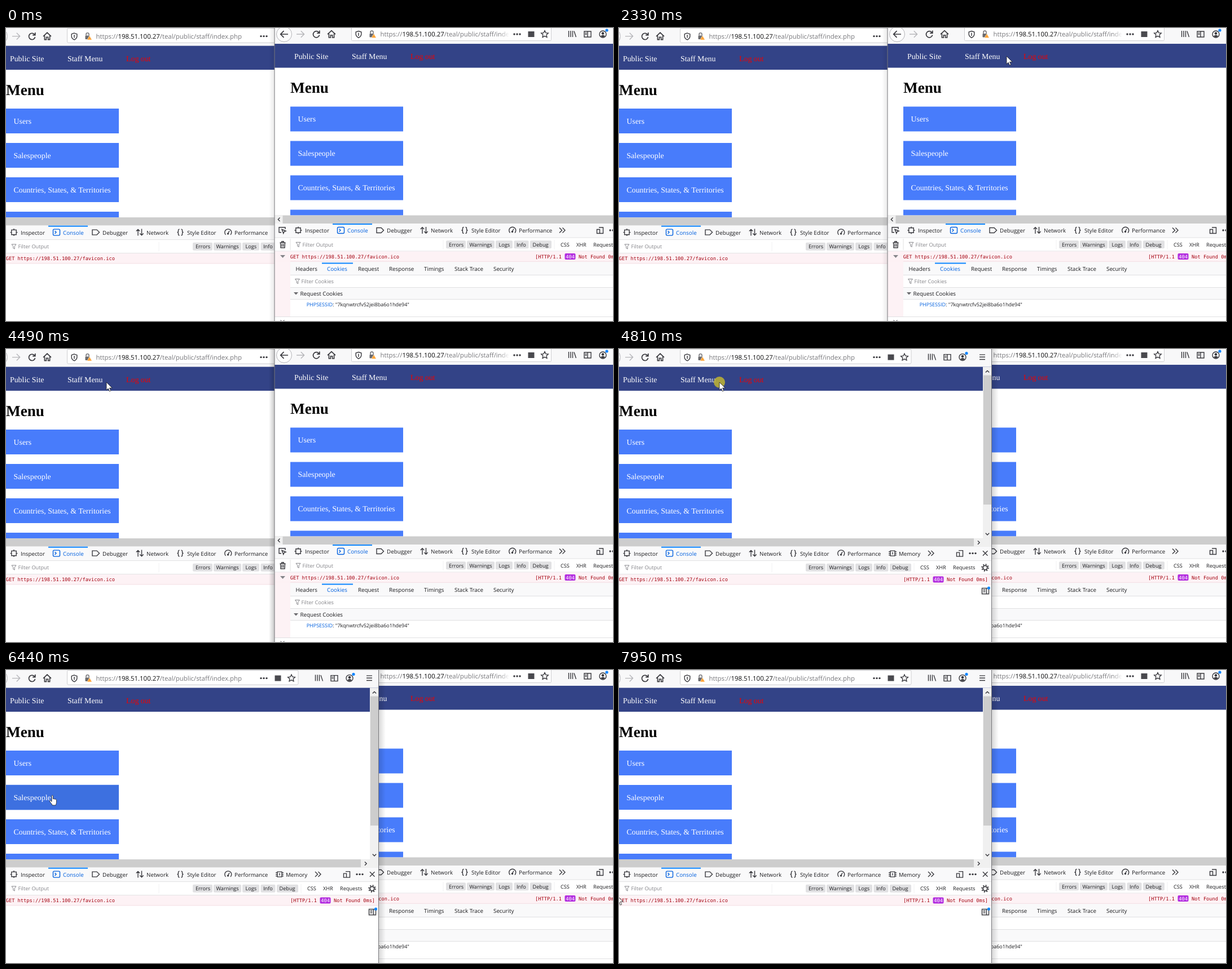
An HTML page for the animation above (8 s loop, 1076 by 520 pixels).

```html
<!DOCTYPE html>
<html lang="en">
<head>
<meta charset="utf-8">
<title>Two windows</title>
<style>
html, body { margin: 0; width: 100%; height: 100%; overflow: hidden; background: #fff }
svg { display: block; width: 1076px; height: 520px }
text { font: 9.8px "Open Sans", "Noto Sans", sans-serif; fill: #1c1c1f; text-rendering: geometricPrecision; white-space: pre }
.url { font-size: 11.42px; fill: #77777b }
.url tspan { fill: #0c0c0d }
.serif text { font: 13.85px "Liberation Serif", serif; fill: #fff }
.serif .h { font-size: 27.2px; font-weight: bold; fill: #000 }
.serif .out { fill: #f00000 }
.mono { font: 8.69px "DejaVu Sans Mono", monospace; fill: #a4000f }
.small { font-size: 9.2px }
.tiny { font-size: 9px }
.tip text { font-size: 9.96px }
.dim { fill: #85858a }
.blue { fill: #0060df }
.i { fill: none; stroke: #38383d; stroke-width: 1.4 }
.line { stroke: #e0e0e2; stroke-width: 1 }
.pale { stroke: #f1f1f2 }
.btn { fill: #487cfb }
.hover { fill: #3d70e0 }

.front, .shade, .click, .hover, .tip, .cursor { animation: 8s step-end infinite }
.front { animation-name: front }
.shade { animation-name: shade }
.click { animation-name: click }
.users { animation-name: users }
.sales { animation-name: sales }
.tip1 { animation-name: tip1 }
.tip2 { animation-name: tip2 }
.cursor { animation-name: move }
.hand { opacity: var(--hand) }
.arrow { opacity: calc(1 - var(--hand)) }

@keyframes front { 0% { opacity: 1 } 60.125%, 100% { opacity: 0 } }
@keyframes shade { 0% { opacity: .4 } 36.625% { opacity: 1 } 60.125%, 100% { opacity: 0 } }
@keyframes click { 0% { opacity: 0 } 60.125% { opacity: 1 } 61.875%, 100% { opacity: 0 } }
@keyframes users { 0% { opacity: 0 } 74.375% { opacity: 1 } 78.875%, 100% { opacity: 0 } }
@keyframes sales { 0% { opacity: 0 } 78.875% { opacity: 1 } 85.375%, 100% { opacity: 0 } }
@keyframes tip1 { 0% { opacity: 0 } 84.125% { opacity: 1 } 88.5%, 100% { opacity: 0 } }
@keyframes tip2 { 0% { opacity: 0 } 88.5% { opacity: 1 } 95.25%, 100% { opacity: 0 } }
@keyframes move {
  0% { transform: translate(-50px, -50px); --hand: 0 }
  5.875% { transform: translate(1034px, 502px) }
  7.75% { transform: translate(950px, 408px) }
  9.25% { transform: translate(860px, 318px) }
  12.125% { transform: translate(828px, 284px) }
  13.625% { transform: translate(785px, 240px) }
  15.125% { transform: translate(732px, 200px) }
  16.625% { transform: translate(760px, 182px) }
  18.375% { transform: translate(735px, 150px) }
  19.875% { transform: translate(711px, 121px) }
  24.375% { transform: translate(708px, 98px) }
  25.875% { transform: translate(697px, 70px) }
  27.375% { transform: translate(687px, 52px) }
  29.125% { transform: translate(687px, 50px) }
  33.625% { transform: translate(680px, 51px) }
  35.125% { transform: translate(665px, 52px); --hand: 1 }
  36.625% { transform: translate(645px, 54px) }
  38.25% { transform: translate(625px, 56px) }
  39.875% { transform: translate(603px, 56px); --hand: 0 }
  46.125% { transform: translate(564px, 54px); --hand: 1 }
  47.625% { transform: translate(500px, 56px); --hand: 0 }
  49.25% { transform: translate(420px, 57px) }
  50.75% { transform: translate(330px, 58px) }
  52.375% { transform: translate(240px, 56px); --hand: 1 }
  53.875% { transform: translate(179px, 58px); --hand: 0 }
  56.125% { transform: translate(178px, 59px) }
  61.875% { transform: translate(150px, 58px); --hand: 1 }
  63.625% { transform: translate(112px, 60px) }
  65% { transform: translate(62px, 65px); --hand: 0 }
  72.875% { transform: translate(66px, 120px) }
  74.375% { transform: translate(69px, 163px); --hand: 1 }
  75.875% { transform: translate(71px, 172px) }
  77.375% { transform: translate(74px, 184px) }
  78.875% { transform: translate(78px, 207px) }
  80.375% { transform: translate(82px, 222px) }
  81.875% { transform: translate(85px, 231px) }
  84.125% { transform: translate(95px, 240px) }
  85.375% { transform: translate(108px, 258px) }
  86.75% { transform: translate(120px, 273px) }
  88.5% { transform: translate(95px, 298px) }
  89.875% { transform: translate(62px, 322px); --hand: 0 }
  94.25% { transform: translate(36px, 348px) }
  95.25% { transform: translate(18px, 366px) }
  96.25% { transform: translate(4px, 380px) }
  98% { transform: translate(1px, 391px) }
  99.375%, 100% { transform: translate(-3px, 401px); --hand: 0 }
}
</style>
</head>
<body>
<svg viewBox="0 0 1076 520">
<defs>
  <linearGradient id="fade"><stop stop-color="#fff" stop-opacity="0"/><stop offset="1" stop-color="#fff"/></linearGradient>
  <linearGradient id="dark"><stop stop-opacity="0"/><stop offset="1" stop-opacity=".22"/></linearGradient>
  <g id="dots" fill="#38383d"><circle cx="-5" r="1.7"/><circle r="1.7"/><circle cx="5" r="1.7"/></g>
  <path id="funnel" d="M-4-4H4L1.2-.3V4.2L-1.2 2.8V-.3Z" fill="none" stroke="#85858a"/>
  <path id="more" class="i" d="M-5-4.5L-.5 0-5 4.5M.5-4.5L5 0 .5 4.5"/>

  <!-- window surfaces -->
  <g id="bg">
    <rect y="-6" width="689" height="532" fill="#fff"/>
    <rect y="-6" width="689" height="34" fill="#f8f8f9"/>
    <rect y="28" width="689" height="42.5" fill="#334387"/>
    <path class="btn" d="M28 139.5h200v44H28zM28 200.5h200v44H28zM28 261.5h200v44H28zM28 322.5h200v10H28z"/>
    <rect y="332.5" width="689" height="14.5" fill="#cdcdcd"/>
    <rect y="347" width="689" height="24.5" fill="#f9f9fa"/>
    <rect x="103" y="347.1" width="70" height="2" fill="#0a84ff"/>
    <path class="line" d="M0 372h689M0 396h689M28 374v20"/>
    <path class="pale" d="M299 376v17"/>
    <rect y="396.5" width="689" height="17.5" fill="#fdf2f5"/>
    <path d="M0 414.3h689" stroke="#f3dce2"/>
  </g>

  <!-- left aligned content -->
  <g id="fg">
    <circle cx="17" cy="11" r="13.5" fill="#fdfdfd" stroke="#b4b4b8"/>
    <path class="i" d="M24 11H11M16.5 5.2L10.7 11l5.8 5.8" style="stroke-width:1.7"/>
    <path class="i" d="M39 11h13M46.8 5.2L52.6 11l-5.8 5.8" style="stroke:#b6b6ba"/>
    <path class="i" d="M78.8 8.2A5.6 5.6 0 1 0 79.6 12.4M79.8 4.5v4.6h-4.6" style="stroke-width:1.7"/>
    <path class="i" d="M94 11.2L101 4.6l7 6.6M96.4 10v7h3v-4.3h3.2V17h3v-7" style="stroke-width:1.6"/>
    <g class="serif">
      <text x="35" y="55.3">Public Site</text>
      <text x="137" y="55.3">Staff Menu</text>
      <text x="241" y="55.3" class="out">Log out</text>
      <text x="28" y="115.3" class="h">Menu</text>
      <text x="41.5" y="166.2">Users</text>
      <text x="41.5" y="227.2">Salespeople</text>
      <text x="41.5" y="288.2">Countries, States, &amp; Territories</text>
    </g>
    <path class="i" d="M37.8 354.8h8.4v8.4h-8.4zM42 352.5v3M42 362.5v3M35.5 359h3M45.5 359h3"/>
    <text x="54" y="363">Inspector</text>
    <g class="i" style="stroke:#0060df"><rect x="111.5" y="353.5" width="12" height="11" rx="2"/><path d="M114.5 356.5l2.5 2.5-2.5 2.5"/></g>
    <text x="129" y="363" class="blue">Console</text>
    <path class="i" d="M181 354.5h8l4.5 4.5-4.5 4.5h-8z"/>
    <text x="199" y="363">Debugger</text>
    <path class="i" d="M262 365v-11M258.8 357l3.2-3.2 3.2 3.2M268.5 353v11M265.3 361l3.2 3.2 3.2-3.2"/>
    <text x="277" y="363">Network</text>
    <path class="i" d="M335.5 353.5q-2 0-2 2v1.5q0 2-2 2 2 0 2 2v1.5q0 2 2 2M338.5 353.5q2 0 2 2v1.5q0 2 2 2-2 0-2 2v1.5q0 2-2 2"/>
    <text x="349" y="363">Style Editor</text>
    <path class="i" d="M417.5 363.5a6 6 0 1 1 8.5 0M421.5 361l2.5-4.5"/><circle cx="421.5" cy="361.5" r="1.7" fill="#38383d"/>
    <text x="433" y="363">Performance</text>
    <use href="#funnel" x="42" y="384.3"/>
    <text x="49.5" y="387.8" class="small dim">Filter Output</text>
    <text x="27.7" y="408.7" class="mono">GET https://198.51.100.27/favicon.ico</text>
  </g>

  <!-- content of the address field -->
  <g id="address">
    <path class="i" d="M149 5.5l4.8 1.6v4c0 3-2 4.8-4.8 6.2-2.8-1.4-4.8-3.2-4.8-6.2v-4zM149 8.5v5.5"/>
    <rect x="168.5" y="10" width="8" height="6.5" rx="1" fill="#6a6a6e"/>
    <path class="i" d="M170 10V7.5a2.5 2.5 0 0 1 5 0V10" style="stroke:#6a6a6e"/>
    <path d="M176 10l4.3 7.5h-8.6z" fill="#ffa436" stroke="#fff" stroke-width=".5"/>
    <text x="187.5" y="15" class="url">https://<tspan>198.51.100.27</tspan>/teal/public/staff/index.php</text>
  </g>

  <!-- right aligned content -->
  <g id="side">
    <use href="#dots" x="430" y="11"/>
    <rect x="449.5" y="6" width="11" height="10" fill="#4a4a4f"/>
    <path class="i" d="M479 4.6l1.9 4 4.4.5-3.2 3 .8 4.3-3.9-2.1-3.9 2.1.8-4.3-3.2-3 4.4-.5z"/>
    <path class="i" d="M521.5 5v11M525 5v11M528.5 5v11M531 5.5l3.5 10.5"/>
    <path class="i" d="M549 6h12v10h-12zM555 6v10M550.5 9h3M550.5 11.5h3"/>
    <circle class="i" cx="582" cy="11" r="6"/><circle cx="582" cy="9.5" r="2.3" fill="#38383d"/><path d="M578 14.5q4-4 8 0-4 3.5-8 0" fill="#38383d"/>
    <circle cx="589" cy="4" r="2.6" fill="#0a84ff"/>
    <path class="i" d="M612 6.5h10M612 10.7h10M612 14.9h10"/>
    <path class="i" d="M575 354h7.5v10.5H575M571.5 357.5h5v7h-5z"/>
    <use href="#dots" x="600" y="359"/>
    <path class="i" d="M618 354.7l8.5 8.5M626.5 354.7l-8.5 8.5"/>
    <g fill="#e1e1e3">
      <rect x="304" y="377.2" width="35" height="14" rx="2"/><rect x="341" y="377.2" width="49" height="14" rx="2"/>
      <rect x="392" y="377.2" width="30" height="14" rx="2"/><rect x="424.5" y="377.2" width="26" height="14" rx="2"/>
      <rect x="453" y="377.2" width="38" height="14" rx="2"/>
    </g>
    <path class="pale" d="M496 376v17"/>
    <text class="small" x="309" y="387.8">Errors</text><text class="small" x="345.5" y="387.8">Warnings</text>
    <text class="small" x="397.5" y="387.8">Logs</text><text class="small" x="429" y="387.8">Info</text>
    <text class="small" x="457.5" y="387.8">Debug</text><text class="small" x="507" y="387.8">CSS</text>
    <text class="small" x="535" y="387.8">XHR</text><text class="small" x="565" y="387.8">Requests</text>
    <circle class="i" cx="622" cy="384.5" r="3.8" style="stroke-width:1.8"/>
    <circle class="i" cx="622" cy="384.5" r="5.8" style="stroke-width:2;stroke-dasharray:2 2.55"/>
  </g>
  <g id="status">
    <text class="mono" y="408.7">[HTTP/1.1</text>
    <rect x="52.5" y="400" width="19" height="11" rx="2" fill="#b32ee0"/>
    <text class="mono" x="54.3" y="408.7" style="fill:#fff">404</text>
    <text class="mono" x="77" y="408.7">Not Found 0ms]</text>
  </g>

  <g id="right" transform="translate(476)">
    <use href="#bg"/>
    <rect x="136.5" y="-5" width="354" height="27.5" rx="2" fill="#fff" stroke="#cfcfd2"/>
    <use href="#address"/>
    <rect x="398" y="1" width="18" height="20" fill="url(#fade)"/><rect x="416" y="1" width="73" height="20" fill="#fff"/>
    <use href="#fg"/><use href="#side"/><use href="#status" x="462"/>
    <rect y="332.5" width="14.5" height="14.5" fill="#f0f0f0"/><path class="i" d="M9.5 336.5l-3.2 3.2 3.2 3.2"/>
    <path class="i" d="M19 357v-3.2H8v9h4M13 357.5l7 2.8-3 1.2-1.2 3z"/>
    <use href="#more" x="510" y="359"/>
    <path class="i" d="M9.5 381h10M12.8 380.5v-1.7h3.4v1.7M10.5 381.5l.5 8.5h7l.5-8.5M13.2 383v5M15.8 383v5"/>
    <rect y="414" width="28" height="98" fill="#fdf2f5"/>
    <path d="M10 403h9l-4.5 5z" fill="#85858a"/>
    <rect x="28" y="415" width="661" height="23" fill="#f9f9fa"/>
    <rect x="28" y="460" width="661" height="21" fill="#f9f9fa"/>
    <path class="line" d="M28 438.5h661M28 460.5h661M28 481.5h661M0 512.5h689"/>
    <rect x="84" y="416.5" width="55" height="2" fill="#0a84ff"/>
    <text x="37.5" y="430.7">Headers</text><text x="93" y="430.7" class="blue">Cookies</text>
    <text x="148" y="430.7">Request</text><text x="203" y="430.7">Response</text>
    <text x="265" y="430.7">Timings</text><text x="319" y="430.7">Stack Trace</text><text x="388" y="430.7">Security</text>
    <use href="#funnel" x="40.5" y="449.5"/><text x="47.5" y="453.2" class="small dim">Filter Cookies</text>
    <path d="M34 469h8l-4 4.5z" fill="#6a6a6e"/><text x="45.5" y="474.5">Request Cookies</text>
    <text x="56.7" y="494" class="tiny"><tspan class="blue">PHPSESSID</tspan>: "7kqnwtrcfv52jei8ba6o1hde94"</text>
    <path class="i" d="M10.5 518.5l3.5 3 3.5-3" style="stroke:#85858a"/>
    <path d="M0 0v520" stroke="#77777b"/>
  </g>
</defs>

<use href="#right"/>

<g transform="translate(-28 3.6)">
  <rect x="689" y="-6" width="12" height="532" fill="url(#dark)" transform="matrix(-1 0 0 1 1390 0)" opacity=".7"/>
  <use href="#bg"/>
  <rect class="hover users" x="28" y="139.5" width="200" height="44"/>
  <rect class="hover sales" x="28" y="200.5" width="200" height="44"/>
  <rect x="136.5" y="-3" width="409.5" height="25.5" rx="2" fill="#fff" stroke="#cfcfd2"/>
  <use href="#address"/><use href="#fg"/><use href="#side" x="55"/><use href="#status" x="532"/>
  <rect x="657" y="332.5" width="32" height="14.5" fill="#f0f0f0"/>
  <rect x="673" y="28" width="16" height="305" fill="#f0f0f0"/>
  <rect x="674" y="43" width="14" height="229.5" fill="#cdcdcd"/>
  <path class="i" d="M664 336.8l3.2 3.2-3.2 3.2M677.8 38l3.2-3.2 3.2 3.2M677.8 323.2l3.2 3.2 3.2-3.2"/>
  <path class="i" d="M509 354.5h8v9h-8zM506 356h3M506 359h3M506 362h3M517 356h3M517 359h3M517 362h3M513 357v4"/>
  <text x="524" y="363">Memory</text>
  <use href="#more" x="581" y="359"/>
  <path class="i" d="M671.5 421h12v10h-12zM679.5 421v10M673.5 424h4M673.5 427h4"/>
  <circle cx="683.5" cy="420.5" r="2.6" fill="#0a84ff"/>
  <path d="M688.5-6v532" stroke="#77777b"/>
</g>

<rect class="shade" x="466" width="10" height="520" fill="url(#dark)"/>
<use class="front" href="#right"/>

<g class="tip tip1">
  <path d="M-2 334h261.5q2 0 2 2v14H-2z" fill="#f4f4f5" stroke="#c4c4c7"/>
  <text y="346">//198.51.100.27/teal/public/staff/salespeople/index.php</text>
</g>
<g class="tip tip2">
  <path d="M-2 334h383q2 0 2 2v14H-2z" fill="#f4f4f5" stroke="#c4c4c7"/>
  <text y="346">//198.51.100.27/teal/public/staff/countries_states_and_territories/index.php</text>
</g>

<circle class="click" cx="178" cy="59" r="10" fill="#c0b432" fill-opacity=".85"/>
<g class="cursor" fill="#fff" stroke="#1c1c1f" stroke-width=".8" stroke-linejoin="round">
  <path class="arrow" d="M0 0v14l3.2-2.9 2.2 5 2.3-1-2.2-4.9h4.7z"/>
  <path class="hand" transform="translate(-5)" d="M4 1.5c0-1.3 2.4-1.3 2.4 0V7c.5-.8 2-.7 2.2.3.6-.7 1.8-.5 2 .4.7-.6 1.9-.2 1.9 1V12c0 3-1 4-1.4 6H5.2C4.5 15.5 1 12.8.4 10.8 0 9.6 1.5 9 2.4 10L4 11.6z"/>
</g>
</svg>
</body>
</html>
```
